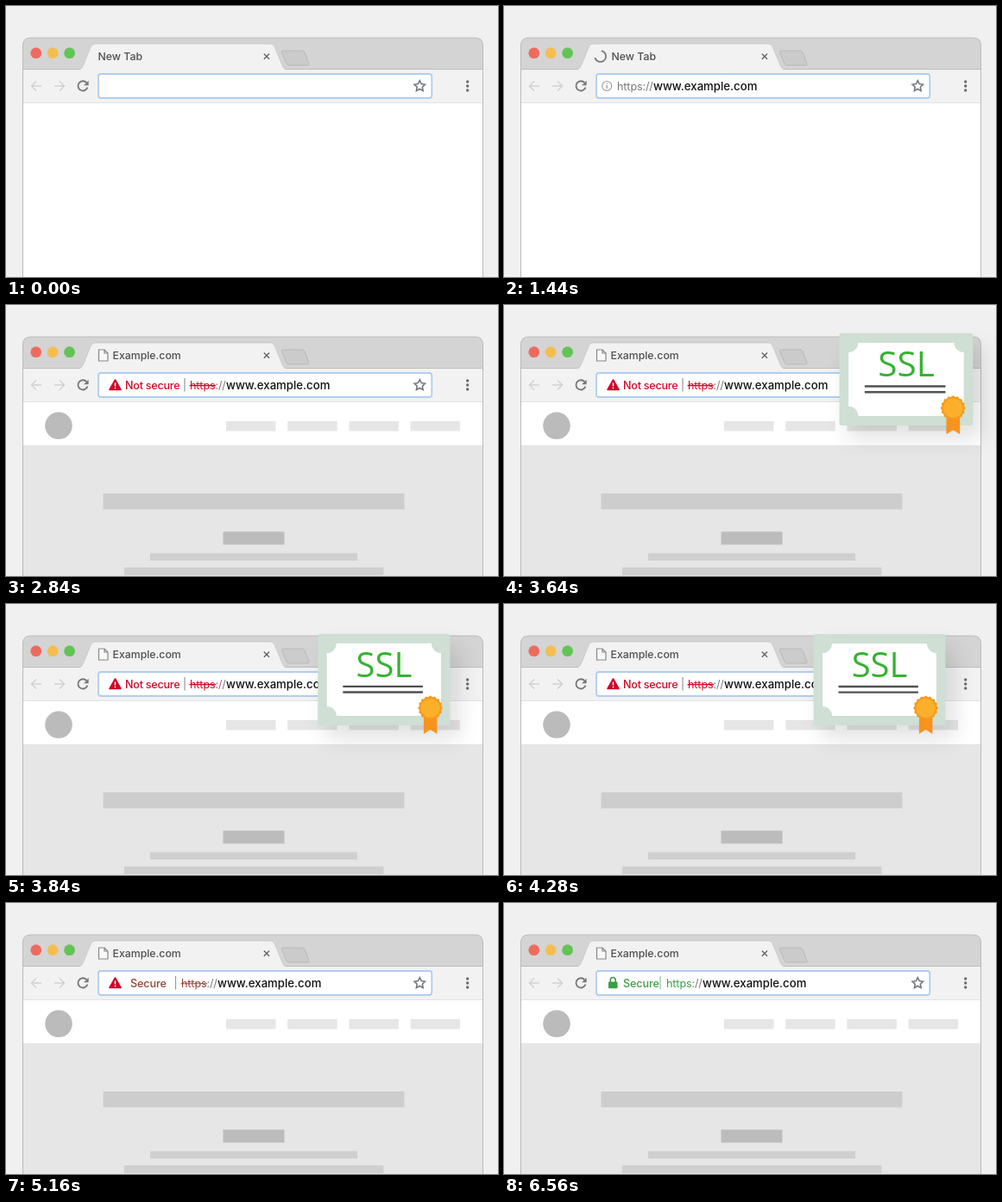
Write an HTML page with a canvas that moves like this. It is 570 by 315 pixels and loops after 6.72 s.

```html
<!DOCTYPE html>
<html lang="en">
<head>
<meta charset="utf-8">
<title>Secure connection</title>
<style>
html, body { margin: 0; width: 570px; height: 315px; overflow: hidden; background: #f0f0f0; }
canvas { display: block; }
</style>
</head>
<body>
<canvas width="570" height="315"></canvas>
<script>
const c = document.querySelector('canvas').getContext('2d');
const LOOP = 6720, STEP = 40, TAU = Math.PI * 2;
const GREY = [120, 120, 120], RED = [206, 8, 42], GREEN = [58, 158, 66];
const KEYS = [40, 120, 200, 280, 360, 440, 560, 640, 760, 840, 1000];

const span = (t, a, b) => Math.min(1, Math.max(0, (t - a) / (b - a)));
const smooth = p => p * p * (3 - 2 * p);
const lerp = (a, b, p) => a + (b - a) * p;
const mix = (a, b, p) => a.map((v, i) => lerp(v, b[i], p));
const rgb = v => `rgb(${v})`;

function faded(alpha, draw) {
  if (alpha <= 0) return;
  c.save();
  c.globalAlpha *= alpha;
  draw();
  c.restore();
}

function rect(x, y, w, h, fill, r = 0) {
  c.fillStyle = fill;
  c.beginPath();
  c.roundRect(x, y, w, h, r);
  c.fill();
}

function disc(x, y, r, fill) {
  c.fillStyle = fill;
  c.beginPath();
  c.arc(x, y, r, 0, TAU);
  c.fill();
}

function stroke(color, width, path) {
  c.strokeStyle = color;
  c.lineWidth = width;
  c.stroke(new Path2D(path));
}

function fill(color, path) {
  c.fillStyle = color;
  c.fill(new Path2D(path));
}

function text(s, x, y, size, color, spacing = 0, weight = 400) {
  c.font = `${weight} ${size}px Inter, sans-serif`;
  c.letterSpacing = spacing + 'px';
  c.fillStyle = color;
  c.fillText(s, x, y);
  return c.measureText(s).width;
}

function star(x, y, r) {
  c.beginPath();
  for (let i = 0; i < 10; i++) {
    const a = i * Math.PI / 5 - Math.PI / 2, d = i % 2 ? r * 0.5 : r;
    c.lineTo(x + d * Math.cos(a), y + d * Math.sin(a));
  }
  c.closePath();
  c.strokeStyle = '#747880';
  c.lineWidth = 1.6;
  c.stroke();
}

function chrome() {
  const frame = 'M19.5 316V46Q19.5 37 28.5 37H543.5Q552.5 37 552.5 46V316';
  fill('#d4d4d4', frame);
  rect(20, 74, 532, 39, '#f2f2f2');
  rect(20, 113, 532, 202, '#fff');
  stroke('#bcbcbc', 1, 'M20 73.5H86M322 73.5H552');
  const tab = 'M85 74Q88 73 90 68L98 48Q99.5 44 103 44H307Q310 44 311.5 48L320 69Q321.5 73 324 74';
  fill('#f2f2f2', tab);
  stroke('#c6c6c6', 0.8, tab);
  const add = 'M320.5 52H343Q345 52 346 54L351 67Q351.5 69 349.5 69H328Q326 69 325 67L319.5 54Q319 52 320.5 52Z';
  fill('#cbcbcb', add);
  stroke('#b9b9b9', 1, add);
  disc(34.8, 54.7, 6.4, '#ee6a5f');
  disc(54.2, 54.7, 6.4, '#f4be4f');
  disc(73.6, 54.7, 6.4, '#61c455');
  stroke('#666', 1.4, 'M298.8 55.6L305 61.8M305 55.6L298.8 61.8');
  stroke('#d2d2d2', 1.5, 'M41 93H29.5M35 87.5L29.5 93L35 98.5M56 93H67.5M62 87.5L67.5 93L62 98.5');
  stroke('#777', 1.8, 'M93.3 89.2A5.6 5.6 0 1 0 94.4 94.6');
  fill('#777', 'M95.6 86.7V92.2H90.1Z');
  stroke('#e2e2e2', 1, 'M20 112.5H552');
  rect(107, 79, 386.3, 28, '#fff', 3);
  c.strokeStyle = '#b0cdf0';
  c.lineWidth = 1.8;
  c.stroke();
  star(479.3, 93.2, 6.5);
  for (const y of [88, 93, 98]) disc(534.7, y, 1.7, '#6c6c6c');
  stroke('#bbb', 1, frame);
}

function page() {
  disc(61, 140.3, 15.8, '#bbb');
  for (let i = 0; i < 4; i++) rect(255 + i * 71.2, 135, 57.5, 11.5, '#e6e6e6');
  rect(20, 163, 532, 152, '#e6e6e6');
  rect(112.5, 219, 349, 18.5, '#cdcdcd');
  rect(251.5, 263.5, 71, 15, '#bcbcbc');
  rect(167, 288.5, 240, 8.5, '#cfcfcf');
  rect(137, 305, 300.5, 9, '#cfcfcf');
}

function tabTitle(t, loaded) {
  const loading = t >= 1440;
  const label = (s, x) => text(s, x, 63, 12.3, '#4f4f4f', 0, 500);
  faded(1 - loaded, () => {
    label('New Tab', loading ? 124.5 : 106.5);
    if (!loading) return;
    const a = (t - 1440) / 800 * TAU - 1.4;
    c.strokeStyle = '#777';
    c.lineWidth = 1.8;
    c.beginPath();
    c.arc(111.7, 58.5, 6.4, a, a + 4.3);
    c.stroke();
  });
  faded(loaded, () => {
    const sheet = 'M107.5 52H114L118 56V65H107.5Z';
    fill('#f8f8f8', sheet);
    stroke('#888', 1.2, sheet + 'M114 52V56H118');
    label('Example.com', 123.5);
  });
}

function infoIcon() {
  stroke('#999', 1.1, 'M113.7 93A5.5 5.5 0 1 0 124.7 93A5.5 5.5 0 1 0 113.7 93');
  stroke('#999', 1.3, 'M119.2 92V96M119.2 89.5V90.8');
}

function warnIcon() {
  c.lineJoin = 'round';
  const path = 'M126.5 87L133 98.5H120Z';
  fill(rgb(RED), path);
  stroke(rgb(RED), 1.6, path);
  stroke('#fff', 1.5, 'M126.5 90.5V94.5M126.5 95.8V97.3');
  c.lineJoin = 'miter';
}

function lockIcon() {
  rect(121, 91.5, 10.5, 7.8, rgb(GREEN), 1);
  stroke(rgb(GREEN), 1.6, 'M123.3 92V89.5A2.95 2.95 0 0 1 129.2 89.5V92');
}

function address(t, loaded, secured) {
  const typed = KEYS.filter(k => t >= k).length;
  if (!typed) return;
  const x = 131 + 82 * loaded - 25 * secured;
  const color = rgb(secured ? mix(RED, GREEN, secured) : mix(GREY, RED, loaded));
  const host = t >= 1440 ? 'www.example.com' : 'www'.slice(0, Math.max(0, typed - 8));

  const w = text('https'.slice(0, typed), x, 97.5, 12.6, color, -0.1);
  if (typed > 5) text('://'.slice(0, typed - 5), x + w, 97.5, 12.6, rgb(GREY), -0.2);
  text(host, x + 42, 97.5, 13.2, '#111', 0, 500);
  faded(loaded * (1 - secured), () => rect(x - 0.5, 93, w + 1, 1.3, rgb(RED)));

  const locked = span(t, 5360, 5520);
  faded(1 - loaded, infoIcon);
  faded(loaded * (1 - locked), warnIcon);
  faded(locked, lockIcon);

  const swap = span(secured, 0, 0.35);
  faded(loaded * (1 - swap), () => text('Not secure', 138, 97.5, 12.6, rgb(RED), -0.25, 500));
  faded(swap, () => text('Secure', 148 - 10 * secured, 97.5, 12.6, color, -0.1, 500));
  faded(loaded, () => rect(206.5 - 26 * secured, 85, 1, 15.5, rgb(mix([130, 130, 130], [130, 175, 130], secured))));
}

function certificate() {
  c.save();
  c.shadowColor = 'rgba(0,0,0,.12)';
  c.shadowBlur = 26;
  c.shadowOffsetX = 10;
  c.shadowOffsetY = 15;
  rect(-76.5, -53, 153, 106, '#cfdfd3', 2);
  c.restore();
  fill('#fff', 'M-55 -42H55A11 11 0 0 0 66 -31V31A11 11 0 0 0 55 42H-55A11 11 0 0 0 -66 31V-31A11 11 0 0 0 -55 -42Z');
  c.font = '500 40px "Open Sans", sans-serif';
  c.letterSpacing = '0px';
  c.textAlign = 'center';
  c.fillStyle = '#36b233';
  c.fillText('SSL', 0, -3);
  c.textAlign = 'left';
  rect(-47.5, 6.8, 92.5, 2.4, '#505050');
  rect(-47.5, 13.4, 92.5, 2.4, '#505050');
  fill('#f7931e', 'M46 40H61.5V63L53.7 58L46 63Z');
  c.fillStyle = '#f79a1f';
  c.beginPath();
  for (let i = 0; i <= 96; i++) {
    const a = i / 96 * TAU, r = 13.6 + 0.7 * Math.cos(16 * a);
    c.lineTo(53.7 + r * Math.cos(a), 33 + r * Math.sin(a));
  }
  c.fill();
  disc(53.7, 33, 11, '#fbb02b');
}

function flyingCertificate(t) {
  if (t < 3400 || t >= 5080) return;
  const rest = (1 - span(t, 3360, 4040)) ** 4;
  const p = span(t, 4040, 5080);
  const scale = (1 + 0.1 * rest) * (1 - 0.7 * p ** 4.3);
  faded(1 - span(t, 4920, 5080), () => {
    c.translate(lerp(436 + 250 * rest, 165, p ** 3.8), lerp(88 - 13 * rest, 93, p ** 3.8));
    c.scale(scale, scale);
    certificate();
  });
}

function draw(now) {
  const t = Math.floor(now % LOOP / STEP) * STEP;
  const loaded = smooth(span(t, 2080, 2680));
  const secured = span(t, 5000, 5400);
  rect(0, 0, 570, 315, '#f0f0f0');
  chrome();
  faded(loaded, page);
  stroke('#bbb', 1, 'M19.5 113V315M552.5 113V315');
  tabTitle(t, loaded);
  address(t, loaded, secured);
  flyingCertificate(t);
}

const start = performance.now();
(function tick() {
  draw(performance.now() - start);
  requestAnimationFrame(tick);
})();
</script>
</body>
</html>
```
